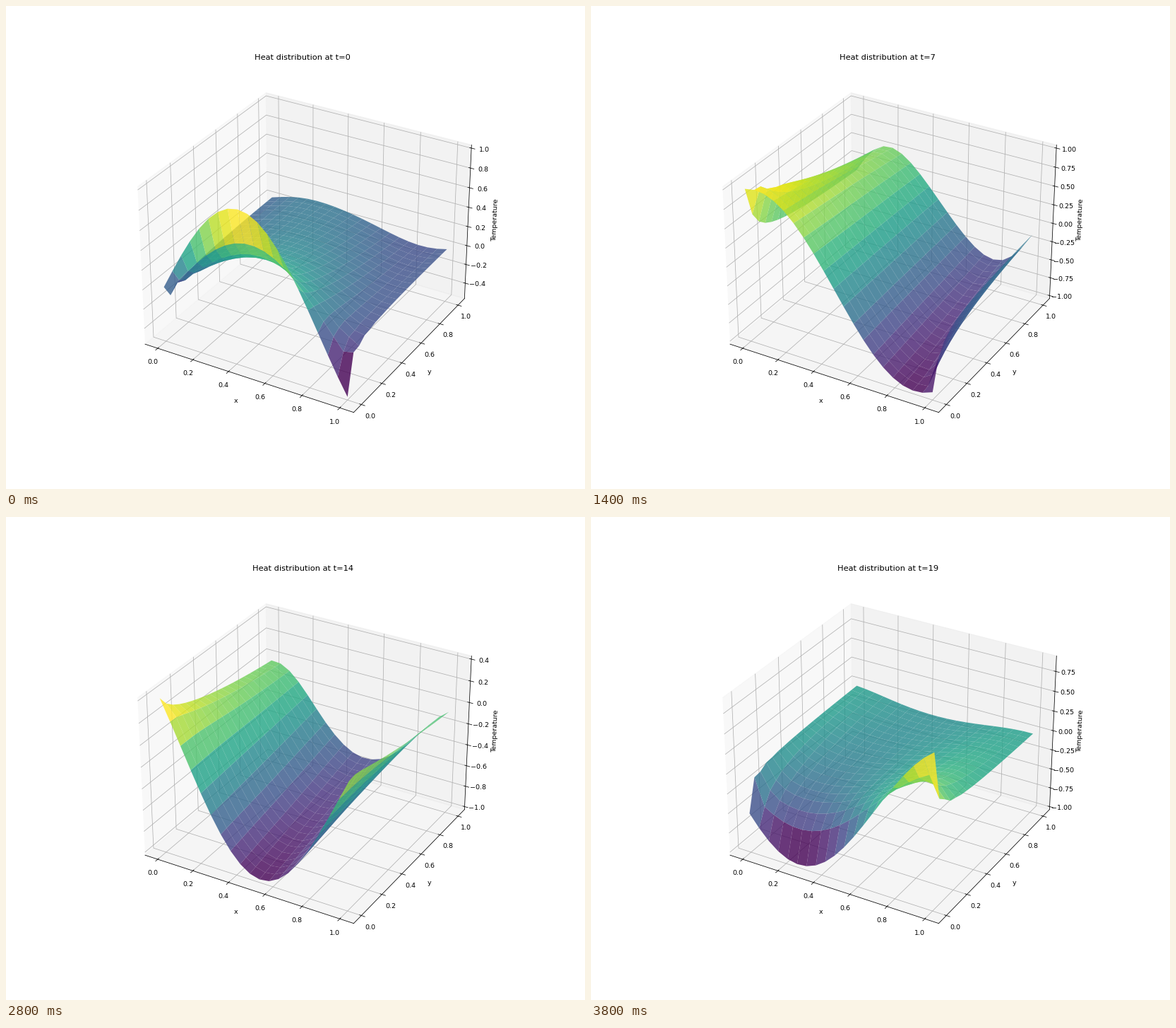
A matplotlib script that plays this animation: 820 by 683 pixels, repeating every 4 s.

```python
import matplotlib.pyplot as plt
import numpy as np
from matplotlib.animation import FuncAnimation

N = 20          # grid cells per axis, and number of frames
WAVE = 0.195    # phase step per cell
RATE = 0.2      # diffusion number per step
DPI = 820 / 12

axis = np.linspace(0, 1, N)
X, Y = np.meshgrid(axis, axis)


def diffuse(u):
    """One explicit heat step on a periodic grid."""
    lap = sum(np.roll(u, s, a) for s in (1, -1) for a in (0, 1)) - 4 * u
    return u + RATE * lap


def solve():
    i = np.arange(N)
    u = [np.sin(WAVE * (i[:, None] + i[None, :]))]
    for _ in range(N - 1):
        u.append(diffuse(u[-1]))
    return np.array(u)


heat = solve()

fig = plt.figure(figsize=(12, 683.001 / DPI), dpi=DPI)
ax = fig.add_subplot(projection="3d")


def draw(t):
    ax.clear()
    ax.plot_surface(X, Y, heat[:, :, t], cmap="viridis", alpha=0.8)
    ax.set_title(f"Heat distribution at t={t}")
    ax.set_xlabel("x")
    ax.set_ylabel("y")
    ax.set_zlabel("Temperature")
    return []


anim = FuncAnimation(fig, draw, frames=N, init_func=lambda: [], interval=200,
                     repeat=True, repeat_delay=0, cache_frame_data=False)
plt.show()
```
